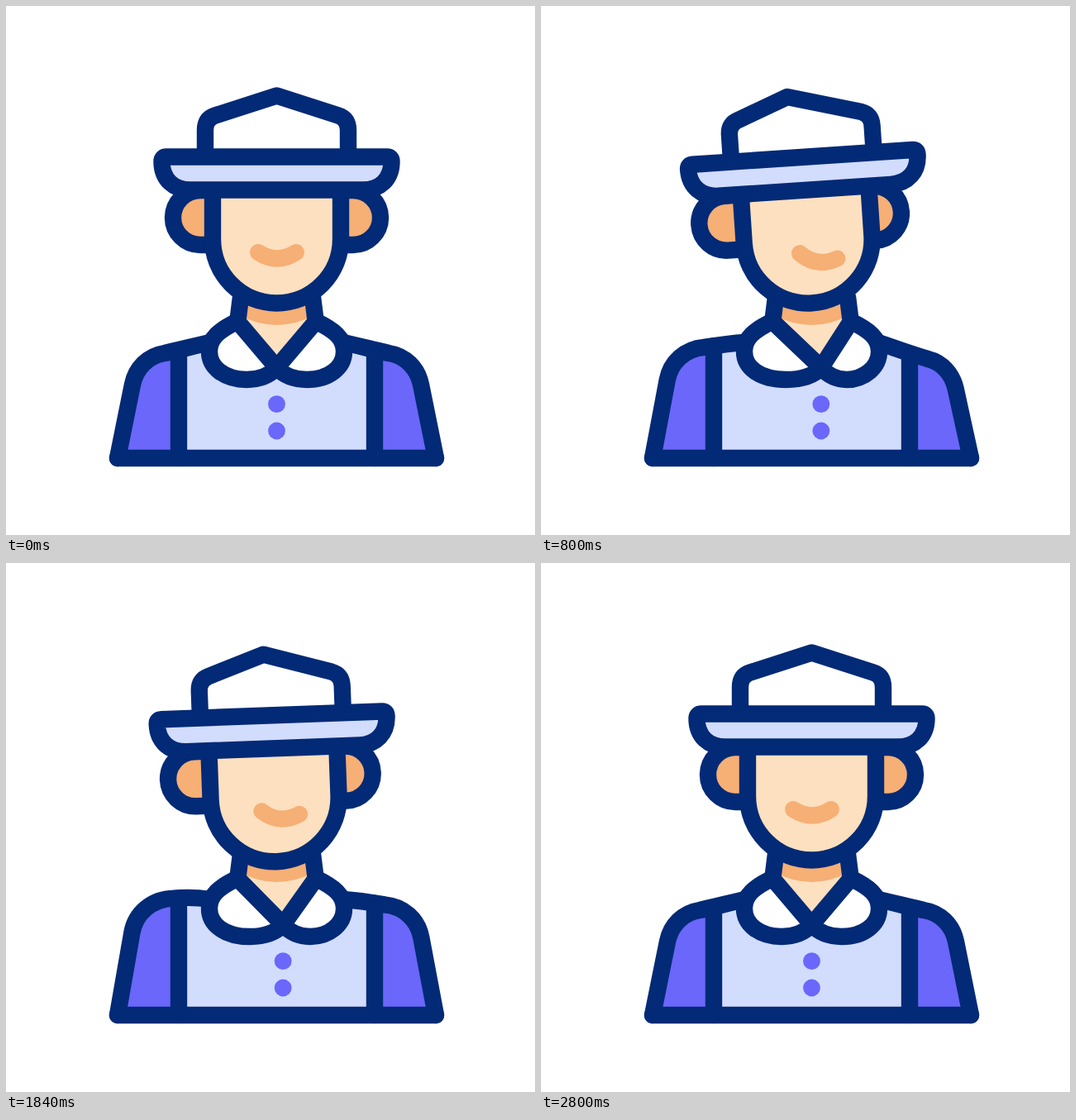
An HTML page for the animation above (3100 ms loop, 640x640 px).

```html
<!DOCTYPE html>
<html lang="en">
<head>
<meta charset="utf-8">
<title>Shrug</title>
<style>
  html, body { margin: 0; width: 100%; height: 100%; overflow: hidden; background: #fff; }
  svg { display: block; width: 100%; height: 100%; }
  .line { fill: none; stroke: #032a76; stroke-width: 20.4; stroke-linecap: round; stroke-linejoin: round; }
  .white { fill: #fff; }
  .pale { fill: #d2dcfd; }
  .violet { fill: #6a67fa; }
  .skin { fill: #fce0bf; }
  .blush { fill: #f6af75; }
  .mouth { fill: none; stroke: #f6af75; stroke-width: 20; stroke-linecap: round; }
</style>
</head>
<body>
<svg viewBox="0 0 640 640">
  <defs>
    <clipPath id="sleeve"><rect x="0" y="0" width="209" height="640"/></clipPath>
  </defs>

  <g id="left">
    <path class="pale cloth"/>
    <path class="violet cloth" clip-path="url(#sleeve)"/>
    <path class="line strap"/>
    <path class="line arm"/>
  </g>
  <g id="right" transform="matrix(-1 0 0 1 655 0)">
    <path class="pale cloth"/>
    <path class="violet cloth" clip-path="url(#sleeve)"/>
    <path class="line strap"/>
    <path class="line arm"/>
  </g>
  <path class="line" d="M135 547H520"/>

  <path class="skin" id="neck"/>
  <path class="blush" d="M284 340L282 374Q327.5 398 373 374L371 340Z"/>
  <path class="line" d="M284 352L280.5 380M371 352L374.5 380"/>
  <path class="line white" id="collarL"/>
  <path class="line white" id="collarR" transform="matrix(-1 0 0 1 655 0)"/>
  <g id="buttons" class="violet">
    <circle cx="327.5" cy="481.7" r="10.4"/>
    <circle cx="327.5" cy="514" r="10.4"/>
  </g>

  <g id="head">
    <path class="line blush" id="earL"/>
    <path class="line blush" id="earR"/>
    <path class="line skin" d="M250 222V282A77.5 77.5 0 0 0 405 282V222"/>
    <path class="line white" id="crown"/>
    <path class="line pale" d="M188.5 188Q188.5 182.5 194 182.5H461Q466.5 182.5 466.5 188C466.5 210 452 222.5 432 222.5H223C203 222.5 188.5 210 188.5 188Z"/>
  </g>
  <path class="mouth" id="mouth" d="M305 298Q328 313 351 298"/>
</svg>
<script>
  const LOOP = 3100;
  const el = id => document.getElementById(id);
  const set = (node, name, value) => node.setAttribute(name, value);

  // Cubic bezier easing with control points (x1, 0) and (x2, 1)
  function ease(t, from, to, x1, x2) {
    const x = (t - from) / (to - from);
    if (x <= 0) return 0;
    if (x >= 1) return 1;
    let lo = 0, hi = 1;
    for (let i = 0; i < 30; i++) {
      const u = (lo + hi) / 2, v = 1 - u;
      if (3 * u * v * v * x1 + 3 * u * u * v * x2 + u ** 3 < x) lo = u; else hi = u;
    }
    return lo * lo * (3 - 2 * lo);
  }

  // lift: 0 at rest, 1 at full shrug
  function drawSide(id, lift) {
    const pt = (x, y, dx, dy) => `${x + dx * lift} ${y + dy * lift} `;
    const arm = 'M135 547L' + pt(153, 458, -1, -15) +
      'C' + pt(157, 438, -1, -21) + pt(172, 423, 6, -24) + pt(192, 420, 16, -21) +
      'C' + pt(210, 416, 12, -17) + pt(229, 411, 6, -9) + '247 407';
    const side = el(id);
    set(side.querySelector('.arm'), 'd', arm);
    set(side.querySelector('.strap'), 'd', `M209 ${417 - 17 * lift}V547`);
    side.querySelectorAll('.cloth').forEach(c => set(c, 'd', arm + 'L330 420V547Z'));
  }

  const collar = d =>
    `M280 381.5L${327.5 + d} 437.5C${318 + d} 448 ${305 + d * .7} 452 ${291 + d * .5} 452` +
    'C264 452 246 437 246 418C246 402 258 392 280 381.5Z';

  const ear = (edge, x, sweep) => `M${edge} 223H${x}A33 33 0 0 ${sweep} ${x} 289H${edge}`;

  function draw(t) {
    const into = ease(t, 100, 1250, .2, .15);
    const out = ease(t, 1300, 2150, .6, .76);
    const tilt = into - out;
    const shrug = out - ease(t, 2150, 2800, .333, .3);
    const shift = 12.5 * (into - ease(t, 1360, 2210, .6, .76));
    const drop = 3.5 * shrug;

    drawSide('left', shrug + .37 * tilt);
    drawSide('right', shrug - .37 * tilt);

    set(el('neck'), 'd', `M284 345L280 380L${327.5 + shift} 438L375 380L371 345Z`);
    set(el('collarL'), 'd', collar(shift));
    set(el('collarR'), 'd', collar(-shift));
    set(el('buttons'), 'transform', `translate(${shift} 0)`);

    set(el('head'), 'transform', `translate(0 ${drop}) rotate(${-4.2 * tilt} 327.5 349)`);
    set(el('earL'), 'd', ear(250, 235 - 5.2 * tilt, 0));
    set(el('earR'), 'd', ear(405, 420 - 11.8 * tilt, 1));
    set(el('crown'), 'd', 'M241 182.5V150Q241 136.5 253 132.5' +
      `L${327.5 - 15 * tilt} 108.5L402 132.5Q414 136.5 414 150V182.5`);
    set(el('mouth'), 'transform',
      `translate(${8.5 * tilt} ${4.7 * tilt + drop}) rotate(${8.7 * tilt} 328 298)`);
  }

  function tick() {
    draw(performance.now() % LOOP);
    requestAnimationFrame(tick);
  }
  tick();
</script>
</body>
</html>
```
